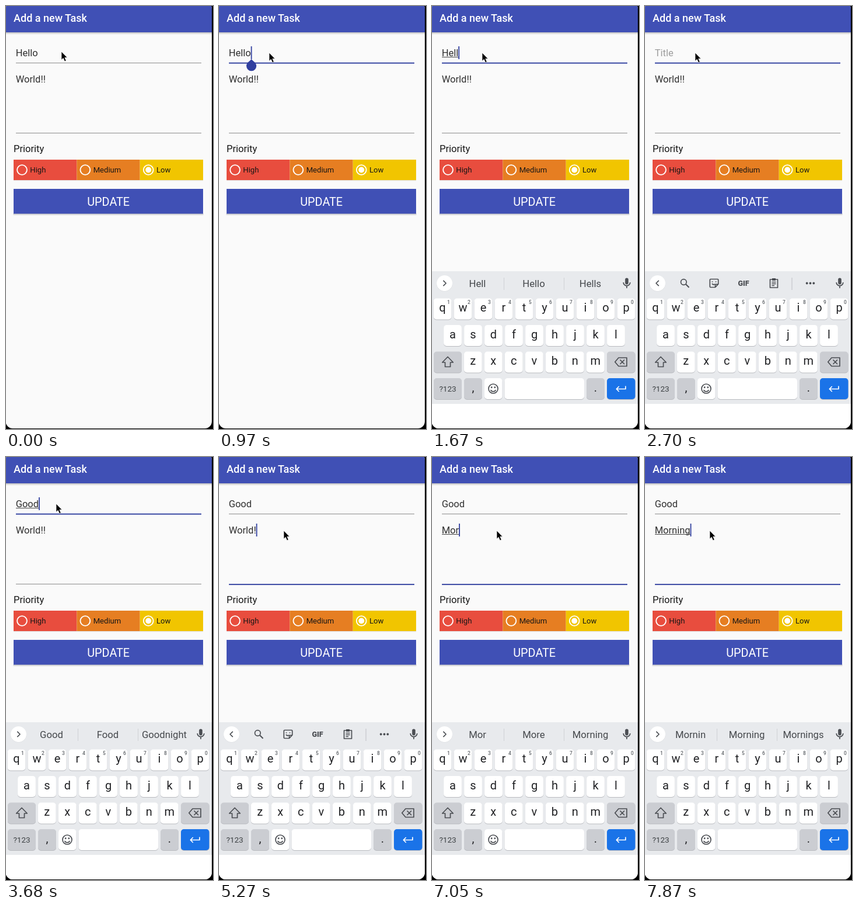
These frames come from a looping animation (355 px wide and 724 px high, 7990 ms). An HTML page:

```html
<!DOCTYPE html>
<html lang="en">
<head>
<meta charset="utf-8">
<title>Add a new Task</title>
<style>
  html, body { margin: 0; width: 100%; height: 100%; overflow: hidden; background: #000; }
  svg { display: block; position: absolute; left: 0; top: 0; }
  text { font-family: Roboto, sans-serif; white-space: pre; }
  .mid { text-anchor: middle; }
  .field { font-size: 16.5px; fill: #303030; }
  .opt { font-size: 13.1px; fill: #161616; }
  .key { font-size: 20px; fill: #202124; text-anchor: middle; }
  .num { font-size: 8.5px; font-weight: 500; fill: #5f6368; text-anchor: middle; }
  .sug { font-size: 16.7px; fill: #45484c; text-anchor: middle; }
  .ico { fill: none; stroke: #4b4e53; stroke-width: 1.7; stroke-linejoin: round; }
</style>
</head>
<body>
<svg width="355" height="724" viewBox="0 0 355 724">
  <defs>
    <clipPath id="phone"><rect x="-.5" y="-7" width="353.5" height="730" rx="12"/></clipPath>
    <linearGradient id="shade" x2="0" y2="1">
      <stop offset="0" stop-color="#000" stop-opacity=".24"/>
      <stop offset="1" stop-color="#000" stop-opacity="0"/>
    </linearGradient>
  </defs>
  <rect width="355" height="724"/>
  <g clip-path="url(#phone)">
    <rect width="355" height="724" fill="#fafafa"/>
    <rect y="45" width="355" height="4" fill="url(#shade)"/>
    <rect width="355" height="45" fill="#4050b5"/>
    <text x="13" y="27" font-size="18" font-weight="500" fill="#fff">Add a new Task</text>

    <g id="fields"></g>

    <text x="13" y="250.3" font-size="16.5" fill="#161616">Priority</text>
    <rect x="13" y="298" width="325" height="2" fill="url(#shade)" opacity=".5"/>
    <g id="options"></g>

    <rect x="12.5" y="355" width="326" height="4" fill="url(#shade)"/>
    <rect x="13" y="313" width="325" height="42.5" fill="#4050b5"/>
    <text class="mid" x="175.7" y="342.3" font-size="19.8" fill="#fff">UPDATE</text>

    <g id="board"></g>
    <path id="pointer" d="M0 0V14.2L3.2 11.3 5.6 16.8 8.2 15.7 5.8 10.3H10Z" stroke="#fff" stroke-width=".7"/>
  </g>
</svg>
<script>
const $ = id => document.getElementById(id);
const LOOP = 7990, LEFT = 16.7, OPEN = 454;

// Entry fields
const fieldMarkup = (id, base, line) => `
  <rect id="${id}Line" x="17" width="318" data-y="${line}"/>
  <text id="${id}Text" class="field" x="${LEFT}" y="${base}"></text>
  <rect id="${id}Under" x="17" y="${base + 1}" height="1" fill="#444"/>
  <rect id="${id}Caret" y="${base - 17}" width="1.8" height="22" fill="#303f9f"/>
  <path id="${id}Handle" fill="#303f9f" d="M0 0C2 3 8.6 5.5 8.6 11.6A8.6 8.6 0 0 1-8.6 11.6C-8.6 5.5-2 3 0 0Z"/>`;
const fields = {
  title: { base: 86, line: 97, hint: "Title" },
  desc: { base: 131, line: 217.5, hint: "Description" }
};
$("fields").innerHTML = Object.entries(fields)
  .map(([id, f]) => fieldMarkup(id, f.base, f.line)).join("");

// Priority options
$("options").innerHTML = [["High", "#e84d3e"], ["Medium", "#e67e22"], ["Low", "#f1c500"]]
  .map(([name, color], i) => {
    const x = 13 + i * 108.35;
    return `<rect x="${x}" y="263" width="108.35" height="35" fill="${color}"/>
      <circle cx="${x + 14.5}" cy="280.5" r="8.4" fill="none" stroke="#fff" stroke-width="1.9"/>
      ${i === 2 ? `<circle cx="${x + 14.5}" cy="280.5" r="5" fill="#fff"/>` : ""}
      <text class="opt" x="${x + 28.3}" y="285.2">${name}</text>`;
  }).join("");

// Keyboard, drawn relative to its top edge
const rowY = [46.5, 92, 137.5, 183];
const cap = (x, row, w, fill = "#fff") =>
  `<rect x="${x}" y="${rowY[row] + 1}" width="${w}" height="36" rx="5" fill="#b9bbc0"/>
   <rect x="${x}" y="${rowY[row]}" width="${w}" height="36" rx="5" fill="${fill}"/>`;
const letters = (chars, row, first) => [...chars].map((c, i) => {
  const x = first + i * 35;
  const num = row ? "" : `<text class="num" x="${x + 10.5}" y="56">${(i + 1) % 10}</text>`;
  return cap(x - 15.4, row, 30.8) + `<text class="key" x="${x}" y="${rowY[row] + 22.7}">${c}</text>` + num;
}).join("");
const GREY = "#cbcdd2";
const divider = x => `<path d="M${x} 11V32" stroke="#cfd1d5"/>`;

$("board").innerHTML = `
  <rect width="355" height="227" fill="#e8eaed"/>
  <rect y="227" width="355" height="50" fill="#fff"/>
  <circle cx="21.5" cy="21" r="13.6" fill="#d6d8db"/>
  <circle cx="21.5" cy="20.5" r="13.5" fill="#fff"/>
  <path id="chevron" class="ico"/>
  <g transform="translate(334 20.5)">
    <rect x="-2.8" y="-9" width="5.6" height="11" rx="2.8" fill="#4b4e53"/>
    <path class="ico" d="M-5.8-1.5A5.8 5.8 0 0 0 5.8-1.5M0 4.5V8.5"/>
  </g>
  <g id="words">
    ${divider(123.5)}${divider(226.5)}
    ${[78, 174.5, 271.5].map(x => `<text class="sug" x="${x}" y="26.8"></text>`).join("")}
  </g>
  <g id="tools" class="ico">
    <circle cx="66.3" cy="18.5" r="4.8"/><path d="M70 22.2L75.5 27.7" stroke-width="2"/>
    <path d="M112.5 13.5H124.5Q125.7 13.5 125.7 14.7V22L120.5 27.5H112.5Q111.3 27.5 111.3 26.3V14.7Q111.3 13.5 112.5 13.5ZM120.5 27V22.3H125.5M115 21Q117 24.2 119.5 22M115.5 17.2V18.7M121.5 17.2V18.7"/>
    <text class="mid" x="169" y="25" font-size="12.5" font-weight="800" fill="#4b4e53" stroke="none">GIF</text>
    <path d="M214.5 14H227.5V28H214.5ZM217.5 18.5H224.5M217.5 21.5H224.5M217.5 24.5H222"/>
    <path d="M218 12H224V16H218Z" fill="#4b4e53" stroke="none"/>
    ${divider(252)}
    ${[277.7, 283.5, 289.3].map(x => `<circle cx="${x}" cy="20.5" r="1.9" fill="#4b4e53" stroke="none"/>`).join("")}
  </g>
  ${letters("qwertyuiop", 0, 18)}
  ${letters("asdfghjkl", 1, 35.5)}
  ${cap(3, 2, 48, GREY)}${letters("zxcvbnm", 2, 70.3)}${cap(300, 2, 48.5, GREY)}
  ${cap(3, 3, 48, GREY)}${cap(55, 3, 31, GREY)}${cap(90, 3, 30.5)}
  ${cap(124.5, 3, 136.5)}${cap(265, 3, 31, GREY)}${cap(300, 3, 48.5, "#1a73e8")}
  <path class="ico" d="M27 146.5L36.3 156H31.5V163.5H22.5V156H17.7Z"/>
  <path class="ico" d="M320 148H334V162.5H320L313.8 155.2ZM322.5 151.5L330 159M330 151.5L322.5 159"/>
  <text class="mid" x="27" y="205.6" font-size="13.5" fill="#3c4043">?123</text>
  <text class="key" x="70.5" y="206">,</text>
  <text class="key" x="280.5" y="206">.</text>
  <g class="ico" transform="translate(105 201)">
    <circle r="8"/><path d="M-4.3 2A4.6 4.6 0 0 0 4.3 2"/>
    <circle cx="-2.8" cy="-2.3" r=".6"/><circle cx="2.8" cy="-2.3" r=".6"/>
  </g>
  <path class="ico" style="stroke:#fff" stroke-linejoin="miter" d="M332 196.5V201.5H316.5M320.8 197L316.3 201.5L320.8 206"/>`;

// Each step changes only the listed values; an empty word list shows the tools.
const steps = [
  [0, { title: "Hello", desc: "World!!", compose: 0, focus: "", caret: 0, handle: 0, words: "", x: 95, y: 78, top: 724 }],
  [280, { x: 93, y: 78.5 }],
  [430, { x: 89, y: 79.5 }],
  [560, { x: 86, y: 80 }],
  [700, { focus: "title" }],
  [850, { caret: 1, handle: 1 }],
  [990, { top: 575, compose: 5, words: "Hello Hellos Hello's" }],
  [1120, { top: 497 }],
  [1270, { top: OPEN }],
  [1390, { caret: 0 }],
  [1670, { caret: 1, handle: 0, title: "Hell", compose: 4, words: "Hell Hello Hells" }],
  [1800, { title: "Hel", compose: 3, words: "Hel Help Hello" }],
  [1950, { title: "He", compose: 2, words: "He Hey Her" }],
  [2100, { title: "H", compose: 1, words: "H Hi He" }],
  [2240, { title: "", compose: 0, words: "" }],
  [2700, { caret: 0 }],
  [2980, { caret: 1, title: "G", compose: 1 }],
  [3110, { words: "G Good Go" }],
  [3260, { title: "Go", compose: 2, words: "Go Good Got" }],
  [3400, { title: "Goo", compose: 3 }],
  [3550, { words: "Goo Good Goods" }],
  [3680, { title: "Good", compose: 4, words: "Good Food Goodnight" }],
  [3830, { x: 98, y: 101 }],
  [3980, { x: 111, y: 126 }],
  [4130, { focus: "desc", compose: 0 }],
  [4270, { handle: 1 }],
  [4400, { words: "" }],
  [4810, { caret: 0 }],
  [5120, { caret: 1 }],
  [5270, { desc: "World!", handle: 0 }],
  [5520, { desc: "World", compose: 5, words: "World Worlds Would" }],
  [5650, { desc: "Wo", compose: 2, words: "Wo Would Work" }],
  [5790, { desc: "", compose: 0, words: "" }],
  [6220, { caret: 0 }],
  [6500, { caret: 1, desc: "M", compose: 1 }],
  [6630, { desc: "Mo", compose: 2, words: "M My Me" }],
  [6770, { desc: "Mor", words: "Mo More Mom" }],
  [7050, { compose: 3, words: "Mor More Morning" }],
  [7330, { desc: "Morn", compose: 4 }],
  [7470, { words: "Morn Morning Mornings" }],
  [7610, { desc: "Morni", compose: 5 }],
  [7750, { desc: "Mornin", compose: 6, words: "Morni Morning Mornings" }],
  [7870, { desc: "Morning", compose: 7, words: "Mornin Morning Mornings" }]
];
let state = {};
const states = steps.map(([, change]) => state = { ...state, ...change });

const set = (el, attrs) => {
  for (const name in attrs) el.setAttribute(name, attrs[name]);
};
const show = (el, on) => { el.style.display = on ? "" : "none"; };

function drawField(id, s) {
  const { base, line, hint } = fields[id], value = s[id], on = s.focus === id;
  const text = $(id + "Text");
  text.textContent = value || hint;
  text.style.fill = value ? "" : "#9c9c9c";
  const width = n => n ? text.getSubStringLength(0, n) : 0;
  const end = LEFT + width(value.length);
  set($(id + "Line"), on
    ? { y: line - .3, height: 1.9, fill: "#303f9f" }
    : { y: Math.floor(line), height: 1, fill: "#8c8c8c" });
  const marked = on ? Math.min(s.compose, value.length) : 0;
  set($(id + "Under"), { width: width(marked) });
  set($(id + "Caret"), { x: end });
  set($(id + "Handle"), { transform: `translate(${end + .9} ${base + 5})` });
  show($(id + "Caret"), on && s.caret);
  show($(id + "Handle"), on && s.handle);
}

function draw(s) {
  drawField("title", s);
  drawField("desc", s);
  const words = s.words ? s.words.split(" ") : [];
  document.querySelectorAll(".sug").forEach((el, i) => { el.textContent = words[i] || ""; });
  show($("words"), s.words);
  show($("tools"), !s.words);
  set($("chevron"), { d: s.words ? "M19.3 15.8L24 20.5L19.3 25.2" : "M23.7 15.8L19 20.5L23.7 25.2" });
  set($("board"), { transform: `translate(0 ${s.top})` });
  set($("pointer"), { transform: `translate(${s.x} ${s.y})` });
}

let shown = -1;
function tick() {
  const t = performance.now() % LOOP;
  const now = steps.findLastIndex(([at]) => at <= t);
  if (now !== shown) draw(states[shown = now]);
  requestAnimationFrame(tick);
}
tick();
</script>
</body>
</html>
```
